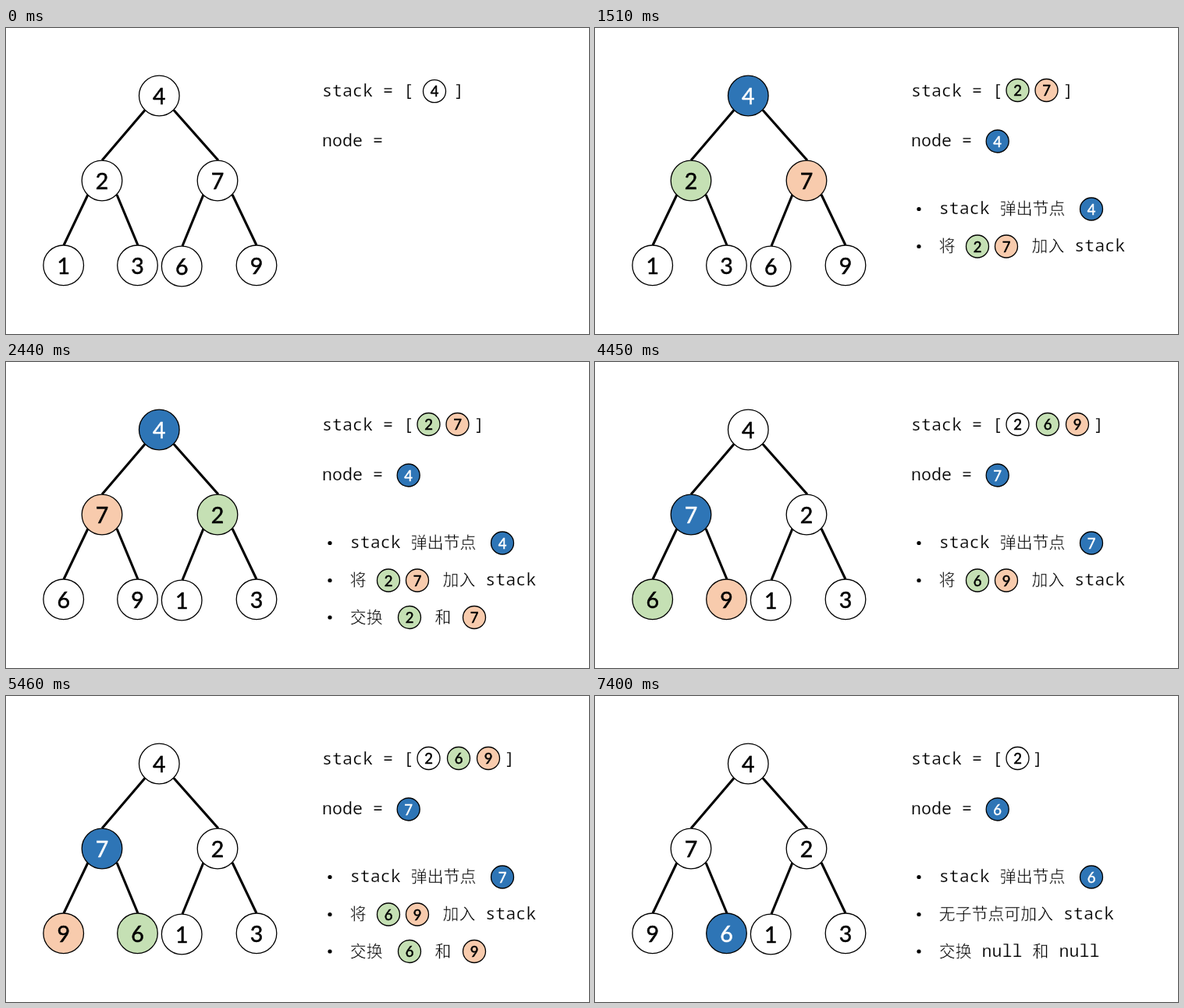
These frames come from a looping animation (747x393 px, 8000 ms). An HTML page:

```html
<!DOCTYPE html>
<html lang="zh">
<head>
<meta charset="utf-8">
<title>Inverting a binary tree with a stack</title>
<style>
  html, body { margin: 0; width: 100%; height: 100%; overflow: hidden; background: #fff; }
  svg { display: block; width: 100%; height: 100%; }
  text { white-space: pre; }
  /* The white outline thins the strokes of the letters. */
  .code { font: 21.67px "Noto Sans Mono", monospace; stroke: #fff; stroke-width: .25px; }
  .han { font: 300 20.9px "Noto Sans CJK SC", "Noto Sans CJK", sans-serif; stroke: #fff; stroke-width: .5px; }
  .digit { font-family: Lato, sans-serif; text-anchor: middle; stroke-width: .5px; }
</style>
</head>
<body>
<svg id="stage" viewBox="0 0 747 393"></svg>
<script>
const LOOP = 8000;
const COLORS = { white: '#fff', blue: '#2e75b6', green: '#c5e0b4', orange: '#f8cbad' };
const CODE_ADVANCE = 13, HAN_ADVANCE = 20.9;
const ROWS = [232.5, 280.5, 328];

// Node places, level by level, and the lines between them.
const PLACES = [[196.3, 87], [123, 196], [271, 196], [73.7, 304.8], [168.5, 304.8], [225.2, 306], [321, 304.8]];
const EDGES = 'M178 105.5L123 170M215 105.5L272 170M105 214L74 279M142 214L169 279M253 214L226 280M290 214L321 279';

function circle([x, y], value, color, radius, size) {
  const ink = color === 'blue' ? '#fff' : '#000';
  return `<circle cx="${x}" cy="${y}" r="${radius}" fill="${COLORS[color]}" stroke="#000" stroke-width="1.3"/>` +
    `<text class="digit" x="${x}" y="${y + size * 0.39}" font-size="${size}" fill="${ink}" stroke="${ink}">${value}</text>`;
}

const chip = (x, y, value, color = 'white') => circle([x, y], value, color, 14.5, 18.5);

// Places Latin and Chinese runs one after the other on a line centred at y.
function write(x, y, string) {
  return string.match(/[\u4e00-\u9fff]+|[^\u4e00-\u9fff]+/g).map(run => {
    const han = run.charCodeAt(0) >= 0x4e00;
    const mark = `<text class="${han ? 'han' : 'code'}" x="${x}" y="${y + 7}">${run}</text>`;
    x += run.length * (han ? HAN_ADVANCE : CODE_ADVANCE);
    return mark;
  }).join('');
}

const note = (row, x, string) => write(x, ROWS[row] - 0.5, string);
const bullet = (row, string) => `<circle cx="415" cy="${ROWS[row]}" r="2.6"/>` + note(row, 440.8, string);
const popped = value => bullet(0, 'stack 弹出节点') + chip(636, ROWS[0], value, 'blue');
const pushed = (a, b) => bullet(1, '将') + chip(490, ROWS[1], a, 'green') +
  chip(527, ROWS[1], b, 'orange') + note(1, 559.5, '加入 stack');
const swapped = (a, b) => bullet(2, '交换') + chip(517, ROWS[2], a, 'green') +
  note(2, 549.5, '和') + chip(600, ROWS[2], b, 'orange');
const leafNotes = bullet(1, '无子节点可加入 stack') + bullet(2, '交换 null 和 null');

// stack: [value, x] pairs; gap: spaces between the brackets.
const STEPS = [
  { at: 0, tree: '4271369', stack: [[4, 549]], stackY: 81.2, gap: 4 },
  { at: 500, tree: '4271369', paint: { 4: 'blue' }, stack: [], gap: 1, node: 4, notes: popped(4) },
  { at: 1510, tree: '4271369', paint: { 4: 'blue', 2: 'green', 7: 'orange' }, stack: [[2, 541.5], [7, 578.5]],
    gap: 6, node: 4, notes: popped(4) + pushed(2, 7) },
  { at: 2440, tree: '4726913', paint: { 4: 'blue', 2: 'green', 7: 'orange' }, stack: [[2, 541.5], [7, 578.5]],
    gap: 6, node: 4, notes: popped(4) + pushed(2, 7) + swapped(2, 7) },
  { at: 3450, tree: '4726913', paint: { 7: 'blue' }, stack: [[2, 541.5]], gap: 3, node: 7, notes: popped(7) },
  { at: 4450, tree: '4726913', paint: { 7: 'blue', 6: 'green', 9: 'orange' },
    stack: [[2, 541.5], [6, 580], [9, 618]], gap: 9, node: 7, notes: popped(7) + pushed(6, 9) },
  { at: 5460, tree: '4729613', paint: { 7: 'blue', 6: 'green', 9: 'orange' },
    stack: [[2, 541.5], [6, 580], [9, 618]], gap: 9, node: 7, notes: popped(7) + pushed(6, 9) + swapped(6, 9) },
  { at: 6470, tree: '4729613', paint: { 9: 'blue' }, stack: [[2, 541.5], [6, 580]], gap: 6, node: 9,
    notes: popped(9) + leafNotes },
  { at: 7400, tree: '4729613', paint: { 6: 'blue' }, stack: [[2, 541.5]], gap: 3, node: 6,
    notes: popped(6) + leafNotes },
];

function draw({ tree, paint = {}, stack, stackY = 80, gap, node, notes = '' }) {
  return `<path d="${EDGES}" stroke="#000" stroke-width="3.1"/>` +
    PLACES.map((place, i) => circle(place, tree[i], paint[tree[i]] || 'white', 25.8, 28.5)).join('') +
    write(405, 80.7, `stack = [${' '.repeat(gap)}]`) +
    stack.map(([value, x]) => chip(x, stackY, value, paint[value])).join('') +
    write(405, 145.3, 'node =') + (node ? chip(515.7, 145.5, node, 'blue') : '') + notes;
}

const stage = document.getElementById('stage');
let shown;

function tick() {
  const time = performance.now() % LOOP;
  const step = STEPS.findLast(({ at }) => at <= time);
  if (step !== shown) stage.innerHTML = draw(shown = step);
  requestAnimationFrame(tick);
}
tick();
</script>
</body>
</html>
```
